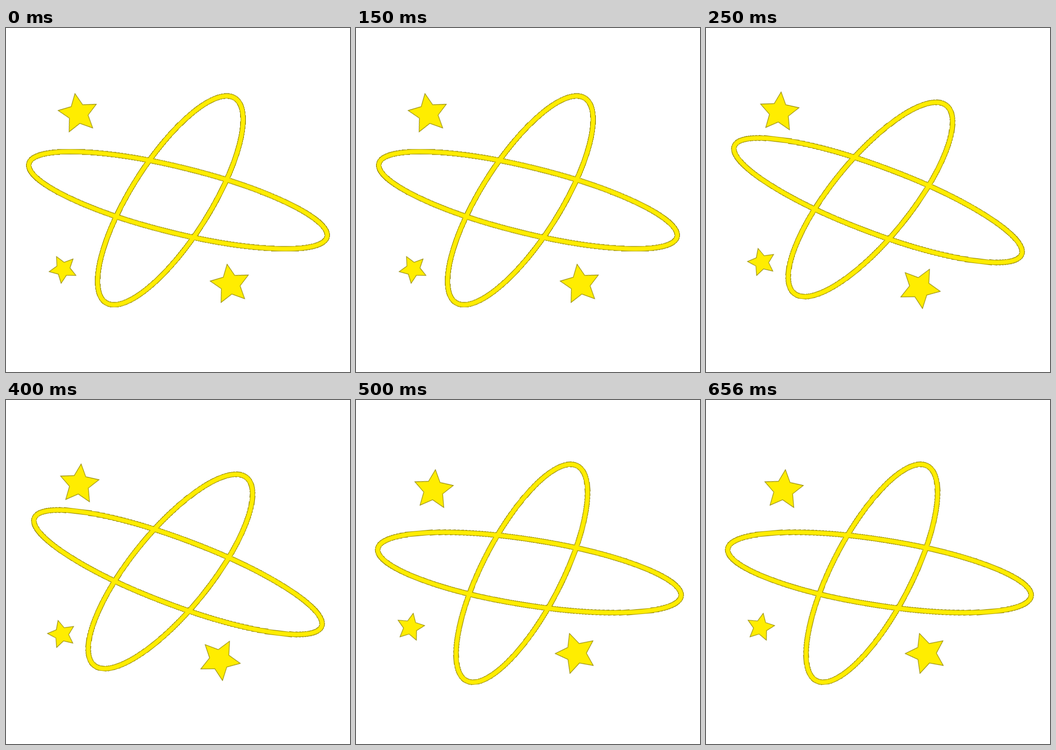
Animation of 720x720 px, one loop 760 ms. Source, as an HTML page without scripts:

```html
<!DOCTYPE html>
<html lang="en">
<head>
<meta charset="utf-8">
<title>Dizzy stars</title>
<style>
  html, body { margin: 0; width: 100%; height: 100%; overflow: hidden; background: #fff; }
  svg { display: block; width: 100vw; height: 100vh; }

  .pose { animation: pose 760ms step-end infinite; }
  /* three held poses: 250, 250 and 260 ms */
  @keyframes pose {
    0%, 100% { transform: var(--a); }
    32.895% { transform: var(--b); }
    65.789% { transform: var(--c); }
  }

  .orbits {
    --a: translate(360px, 360.5px);
    --b: translate(360px, 360.5px) rotate(6.8deg);
    --c: translate(363px, 361px) rotate(-4.95deg);
  }
  .top {
    --a: translate(151.2px, 179.2px) rotate(-9.3deg);
    --b: translate(153.2px, 176.2px) rotate(5.5deg);
    --c: translate(162.2px, 188.2px) rotate(5.5deg);
  }
  .small {
    --a: translate(119.6px, 504.8px) rotate(44.1deg) scale(.7);
    --b: translate(116.6px, 490.2px) rotate(56.9deg) scale(.7);
    --c: translate(114px, 475.6px) rotate(11.4deg) scale(.7);
  }
  .low {
    --a: translate(469.4px, 536.4px) rotate(-9deg);
    --b: translate(447.2px, 543.6px) rotate(28.1deg) scale(1.03);
    --c: translate(460.8px, 530.2px) rotate(-18.7deg) scale(1.03);
  }

  .edge { stroke: #877d00; stroke-width: 11.3; shape-rendering: crispEdges; }
  .rim { stroke: #dccc00; stroke-width: 9.6; }
  .core { stroke: #ffed00; stroke-width: 7.8; }
  #star { fill: #ffed00; stroke: #8f8500; stroke-width: 1.2; vector-effect: non-scaling-stroke; }
</style>
</head>
<body>
<svg viewBox="0 0 720 720">
  <defs>
    <g id="rings">
      <ellipse rx="321.2" ry="68.6" transform="rotate(13.85)"/>
      <ellipse rx="83.3" ry="253" transform="translate(-16 .3) rotate(32.25)"/>
    </g>
    <polygon id="star" stroke-miterlimit="6" points="0,-42.6 12.2,-16.8 40.5,-13.2 19.8,6.4 25,34.5 0,20.8 -25,34.5 -19.8,6.4 -40.5,-13.2 -12.2,-16.8"/>
  </defs>
  <g class="pose orbits" fill="none">
    <use href="#rings" class="edge"/>
    <use href="#rings" class="rim"/>
    <use href="#rings" class="core"/>
  </g>
  <g class="pose top"><use href="#star"/></g>
  <g class="pose small"><use href="#star"/></g>
  <g class="pose low"><use href="#star"/></g>
</svg>
</body>
</html>
```
